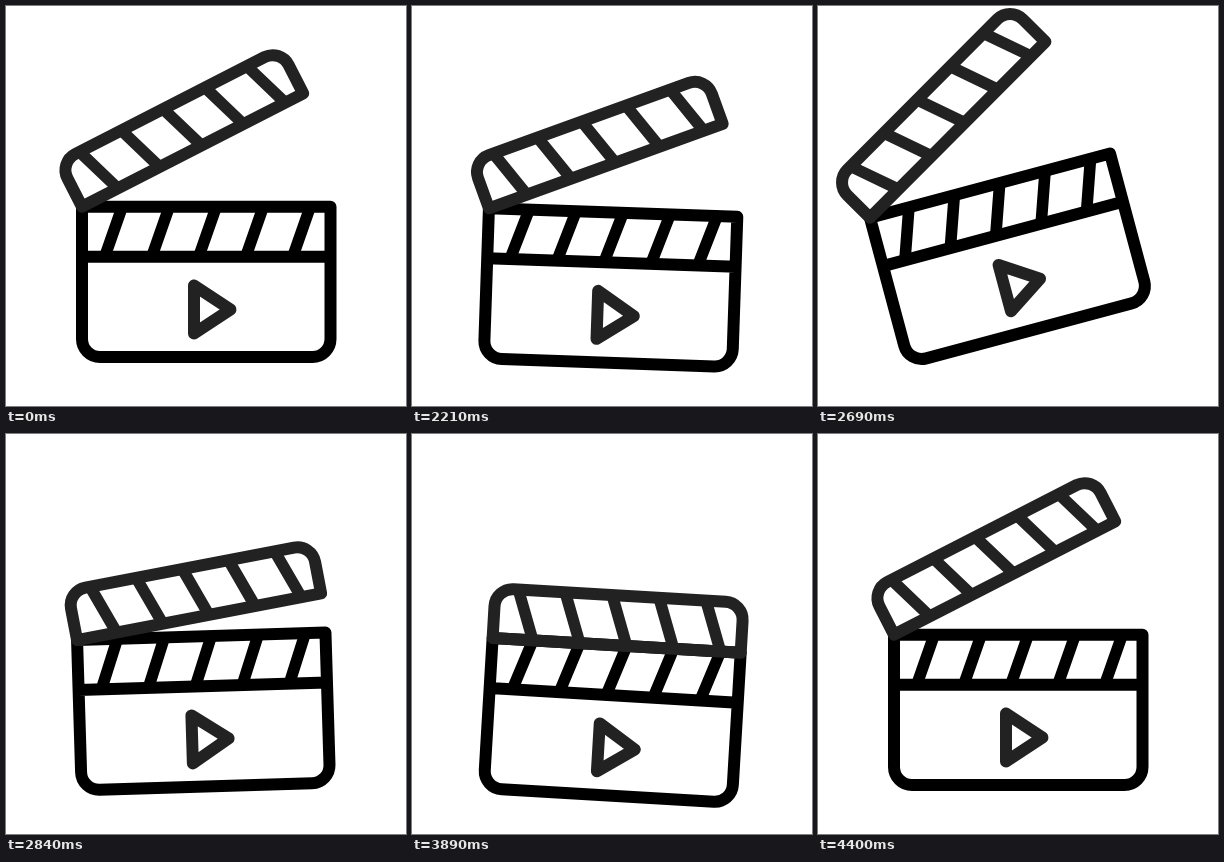
An HTML page that plays this animation: 400x400 px, repeating every 4430 ms.

```html
<!DOCTYPE html>
<html lang="en">
<head>
<meta charset="utf-8">
<title>Clapperboard</title>
<style>
  html, body { margin: 0; width: 100%; height: 100%; overflow: hidden; background: #fff; }
  svg { display: block; width: 100%; height: 100%; }
  path { fill: none; stroke-width: 12; stroke-linejoin: round; }
  .stripes { stroke-width: 11.6; }
</style>
</head>
<body>
<svg viewBox="0 0 400 400">
  <g id="board" stroke="#000">
    <path class="stripes" id="lower"/>
    <path d="M76 200.7H324.5V333a18 18 0 0 1-18 18H94a18 18 0 0 1-18-18ZM76 250.7H324.5"/>
    <path stroke="#222" d="M188 279.5V327.5L224.5 303.5Z"/>
    <g id="arm" stroke="#222">
      <path class="stripes" id="upper"/>
      <path d="M76 200.7H324.5V168.7a18 18 0 0 0-18-18H94a18 18 0 0 0-18 18Z"/>
    </g>
  </g>
</svg>
<script>
  const LOOP = 4430, OPEN = 27.1;
  const [board, arm, lower, upper] =
    ['board', 'arm', 'lower', 'upper'].map(id => document.getElementById(id));

  // Five slanted bars between y and y + 50
  const stripes = (x, y, slant) =>
    Array.from({ length: 5 }, (_, i) => `M${x + 47 * i} ${y}l${slant} 50`).join('');
  lower.setAttribute('d', stripes(116.3, 200.7, -17.5));
  upper.setAttribute('d', stripes(98.8, 150.7, 17.5));

  // Eased 0 to 1 between two times
  const rise = (t, from, to) =>
    Math.sin(Math.min(1, Math.max(0, (t - from) / (to - from))) * Math.PI / 2) ** 2;
  const pulse = (t, from, peak, to) => rise(t, from, peak) - rise(t, peak, to);

  function draw(t) {
    const snap = rise(t, 2690, 2930);
    const dip = pulse(t, 2000, 2120, 2440) + pulse(t, 2690, 2930, 3080) + pulse(t, 3590, 3830, 4070);
    const lean = rise(t, 2120, 2600) - snap;
    const lift = rise(t, 2120, 2440) - snap;
    const opening = OPEN * (1 - snap)
      - 7 * pulse(t, 2030, 2300, 2600)
      + 3 * (rise(t, 2300, 2600) - snap)
      + 1.4 * pulse(t, 3080, 3200, 3320)
      + (OPEN + 9) * rise(t, 3890, 4070) - 9 * rise(t, 4070, 4400);

    board.setAttribute('transform',
      `translate(${-9 * lift} ${12.5 * dip - 23.5 * lift}) rotate(${4 * dip - 15 * lean} 200 275)`);
    arm.setAttribute('transform', `rotate(${-opening} 76 200.7)`);
  }

  const start = performance.now();
  function tick() {
    draw((performance.now() - start) % LOOP);
    requestAnimationFrame(tick);
  }
  tick();
</script>
</body>
</html>
```
